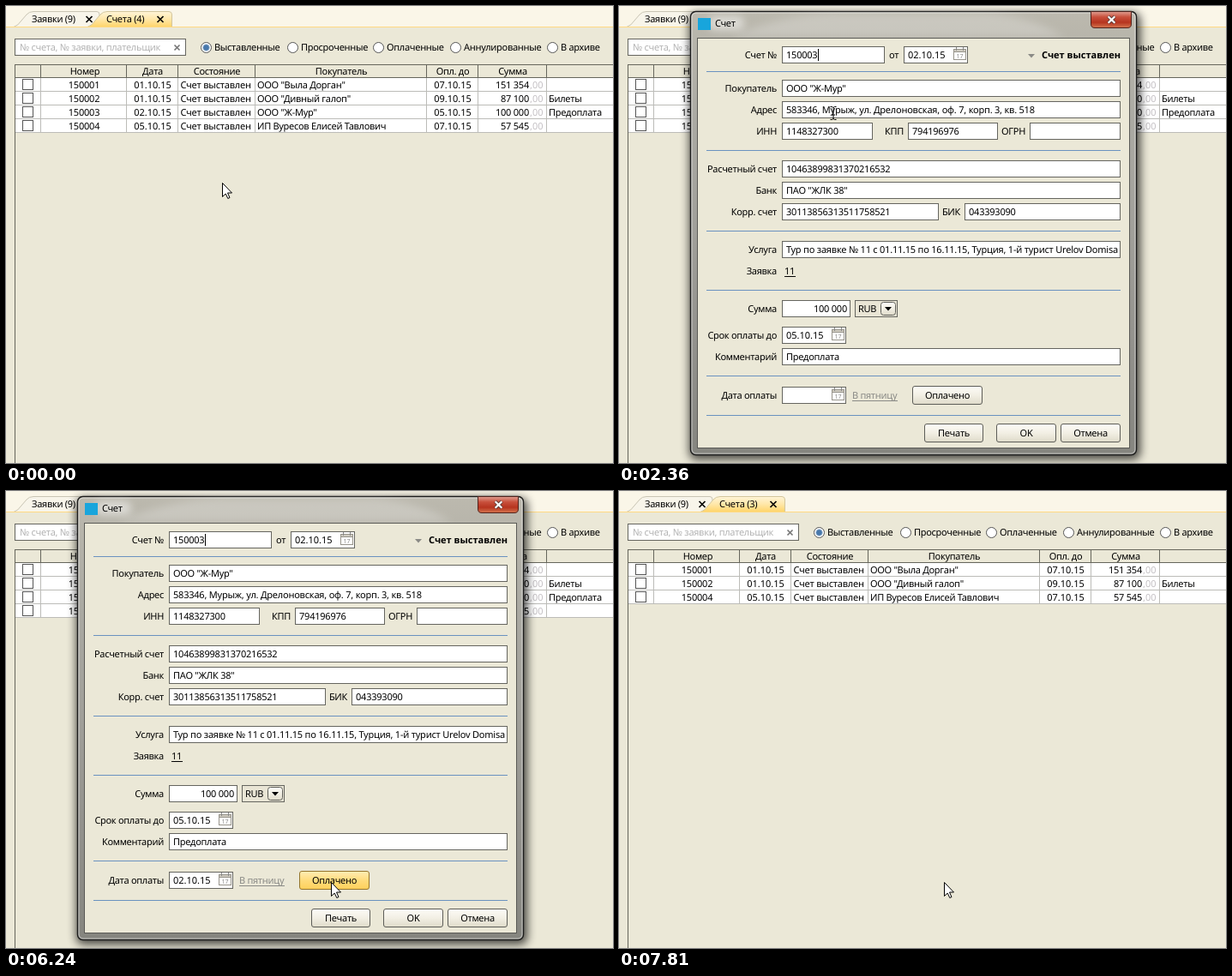
An HTML page that plays this animation: 708x533 px, repeating every 8 s.

```html
<!DOCTYPE html>
<html lang="ru">
<head>
<meta charset="utf-8">
<title>Счета</title>
<style>
html, body { margin: 0; width: 100%; height: 100%; overflow: hidden; background: #ebe8d7; }
svg { display: block; width: 708px; height: 533px; }
text { font: 11px "Noto Sans", "Open Sans", sans-serif; letter-spacing: -.3px; fill: #000; white-space: pre; text-rendering: geometricPrecision; }
.num { letter-spacing: -.22px; }
.date { letter-spacing: 0; }
.bold { font-weight: bold; letter-spacing: 0; }
.hint { fill: #b3b3b3; }
.dim { fill: #c4c0c4; }
.link { fill: #8b8b87; }
.tiny { font-size: 7px; fill: #888; letter-spacing: 0; }
.field { fill: #fff; stroke: #65655f; }
.rule { stroke: #6a92c0; }
.btn { fill: url(#btn); stroke: #5d5d58; }
.x { fill: none; stroke: #000; stroke-width: 1.7; }
</style>
</head>
<body>
<svg id="stage" viewBox="0 0 708 533" xmlns="http://www.w3.org/2000/svg"></svg>
<script>
const LOOP = 8000;
const stage = document.getElementById('stage');

const text = (x, y, s, cls = '', anchor = 'start', extra = '') =>
  `<text x="${x}" y="${y}" class="${cls}" text-anchor="${anchor}" ${extra}>${s}</text>`;
const rect = (x, y, w, h, attrs) => `<rect x="${x}" y="${y}" width="${w}" height="${h}" ${attrs}/>`;
const line = (x1, y1, x2, y2, attrs) => `<path d="M${x1} ${y1}L${x2} ${y2}" ${attrs}/>`;
const cross = (x, y, r, attrs = '') =>
  `<path class="x" d="M${x - r} ${y - r}l${2 * r} ${2 * r}m0 ${-2 * r}l${-2 * r} ${2 * r}" ${attrs}/>`;
const grad = (id, ...stops) => `<linearGradient id="${id}" x2="0" y2="1">` +
  stops.map((c, i) => `<stop offset="${i / (stops.length - 1)}" stop-color="${c}"/>`).join('') + '</linearGradient>';

// Main window
const COLS = [40, 140, 200, 290, 490, 550, 630];
const HEADS = [['Номер', 92], ['Дата', 171], ['Состояние', 246], ['Покупатель', 391], ['Опл. до', 521], ['Сумма', 591]];
const ROWS = [
  ['150001', '01.10.15', 'ООО "Выла Дорган"', '07.10.15', '151 354', ''],
  ['150002', '01.10.15', 'ООО "Дивный галоп"', '09.10.15', '87 100', 'Билеты'],
  ['150003', '02.10.15', 'ООО "Ж-Мур"', '05.10.15', '100 000', 'Предоплата'],
  ['150004', '05.10.15', 'ИП Вуресов Елисей Тавлович', '07.10.15', '57 545', '']
];
const RADIOS = [['Выставленные', 233], ['Просроченные', 334], ['Оплаченные', 434], ['Аннулированные', 524], ['В архиве', 637]];

function tableRow([no, date, buyer, due, sum, note], i) {
  const y = 84 + i * 16, base = y + 12;
  return `<g id="row${i}">` +
    rect(11, y, 697, 16, 'fill="#fff"') +
    line(11, y + 15.5, 708, y + 15.5, 'stroke="#bcbcb8"') +
    COLS.map(x => line(x + .5, y, x + .5, y + 16, 'stroke="#bcbcb8"')).join('') +
    rect(19.5, y + 1.5, 12, 12, 'fill="#fff" stroke="#555"') +
    text(91, base, no, 'num', 'middle') +
    text(171, base, date, 'date', 'middle') +
    text(203.5, base, 'Счет выставлен', 'num') +
    text(293, base, buyer) +
    text(521, base, due, 'date', 'middle') +
    text(610, base, sum, 'num', 'end') +
    text(611, base, ',00', 'dim date') +
    text(633, base, note) + '</g>';
}

function radio([label, x], i) {
  return `<circle cx="${x + .5}" cy="48.5" r="6" fill="#fff" stroke="#555"/>` +
    (i ? '' : `<circle cx="${x + .5}" cy="48.5" r="3.8" fill="#4878ab" stroke="#a9c1da" stroke-width=".8"/>`) +
    text(x + 10, 52, label);
}

function mainWindow() {
  return rect(0, 0, 708, 533, 'fill="#ebe8d7"') +
    rect(0, 0, 708, 24, 'fill="#faf6e8"') +
    '<path d="M9 24.500Q14 23 18 17L24 10Q27 6.500 32 6.500H106Q109 6.500 109 10V24.500" fill="#f8f5ea" stroke="#c9c5b4"/>' +
    '<path d="M95 24.500Q100 23 104 17L110 10Q113 6.500 118 6.500H190Q193.500 6.500 193.500 10V24.500" fill="url(#tab)" stroke="#d3c69c"/>' +
    line(0, 24.5, 708, 24.5, 'stroke="#ffd983"') +
    text(30, 19, 'Заявки (9)') + cross(97, 15.5, 3.5) +
    text(117, 19, '', '', 'start', 'id="count"') + cross(180, 15.5, 3.5) +
    rect(10.5, 38.5, 199, 19, 'class="field"') +
    text(16, 52, '№ счета, № заявки, плательщик', 'hint') +
    cross(199.5, 48.5, 3, 'style="stroke:#777"') +
    RADIOS.map(radio).join('') +
    rect(11, 69, 697, 14, 'fill="#ebe8d7"') +
    line(10, 68.5, 708, 68.5, 'stroke="#66665c"') +
    line(10, 83.5, 708, 83.5, 'stroke="#66665c"') +
    COLS.map(x => line(x + .5, 68, x + .5, 84, 'stroke="#66665c"')).join('') +
    HEADS.map(([s, x]) => text(x, 80, s, '', 'middle')).join('') +
    ROWS.map(tableRow).join('') +
    line(10.5, 68, 10.5, 533, 'stroke="#66665c"') +
    rect(200.7, 115.7, 89.6, 15.6, 'id="cell" fill="none" stroke="#efb93a" stroke-width="1.5"');
}

// Invoice dialog
const label = (y, s, x = 184) => text(x, y, s, '', 'end');
const field = (x, y, w, s = '', cls = '') =>
  rect(x + .5, y + .5, w - 1, 19, 'class="field"') + text(x + 5, y + 14, s, cls);
const button = (x, y, w, s, id = '') =>
  rect(x + .5, y + .5, w - 1, 21, `class="btn" rx="2.500" ${id}`) + text(x + w / 2, y + 15, s, '', 'middle');

function dateField(x, y, s, id = '') {
  const cx = x + 58.5;
  return rect(x + .5, y + .5, 74, 19, 'class="field"') + text(x + 5, y + 14, s, 'date', 'start', id) +
    rect(cx, y + 3.5, 14, 12, 'fill="#fff" stroke="#97948b"') +
    rect(cx, y + 3.5, 14, 3, 'fill="#cfcbc0" stroke="#97948b"') +
    line(cx + 3, y + 1, cx + 3, y + 5, 'stroke="#888"') + line(cx + 11, y + 1, cx + 11, y + 5, 'stroke="#888"') +
    text(cx + 7, y + 14, '17', 'tiny', 'middle');
}

function dialogBody() {
  return [76, 168, 262, 331, 431, 477].map(y => line(102, y + .5, 585, y + .5, 'class="rule"')).join('') +
    label(61, 'Счет №') + field(190, 47, 120, '150003', 'num') + text(315, 61, 'от') + dateField(332, 47, '02.10.15') +
    '<path d="M477 56h8l-4 4.500z" fill="#8a8a86"/>' + text(585, 61, 'Счет выставлен', 'bold', 'end') +
    label(100, 'Покупатель') + field(190, 86, 395, 'ООО "Ж-Мур"') +
    label(125, 'Адрес') + field(190, 111, 395, '583346, Мурыж, ул. Дрелоновская, оф. 7, корп. 3, кв. 518', 'num') +
    label(150, 'ИНН') + field(190, 136, 106, '1148327300', 'num') +
    label(150, 'КПП', 332) + field(337, 136, 105, '794196976', 'num') +
    label(150, 'ОГРН', 474) + field(479, 136, 106) +
    label(194, 'Расчетный счет') + field(190, 180, 395, '10463899831370216532', 'num') +
    label(219, 'Банк') + field(190, 205, 395, 'ПАО "ЖЛК 38"') +
    label(244, 'Корр. счет') + field(190, 230, 183, '30113856313511758521', 'num') +
    label(244, 'БИК', 398) + field(403, 230, 182, '043393090', 'num') +
    label(288, 'Услуга') + field(190, 274, 395) +
    '<g clip-path="url(#service)">' +
    text(195, 288, 'Тур по заявке № 11 с 01.11.15 по 16.11.15, Турция, 1-й турист Urelov Domisan', 'num') + '</g>' +
    label(313, 'Заявка') + text(193, 313, '11', 'num') + line(193, 315.5, 206, 315.5, 'stroke="#000"') +
    label(357, 'Сумма') + field(190, 343, 80) + text(266, 357, '100 000', 'num', 'end') +
    rect(275.5, 343.5, 49, 19, 'fill="#e9e5d5" stroke="#65655f"') + text(279, 357, 'RUB') +
    rect(305.5, 345.5, 17, 15, 'class="btn" rx="3"') + '<path d="M310 351h8l-4 4.500z"/>' +
    label(388, 'Срок оплаты до') + dateField(190, 374, '05.10.15') +
    label(413, 'Комментарий') + field(190, 399, 395, 'Предоплата') +
    label(458, 'Дата оплаты') + dateField(190, 444, '', 'id="paid"') +
    text(272, 458, 'В пятницу', 'link') + line(272, 460.5, 325, 460.5, 'stroke="#8b8b87"') +
    button(342, 443, 82, 'Оплачено', 'id="pay"') +
    button(356, 487, 69, 'Печать') + button(440, 487, 70, 'OK') + button(515, 487, 70, 'Отмена') +
    line(232.5, 50, 232.5, 64, 'id="caret" stroke="#000"');
}

function dialog() {
  return '<g id="dialog">' +
    rect(82, 8, 526, 521, 'rx="8" fill="#000" opacity=".7" filter="url(#blur)"') +
    rect(83.5, 6.5, 520, 517, 'rx="6" fill="url(#glass)" stroke="#1c1c1c" stroke-width="1.4"') +
    '<path d="M130 36Q190 10 250 9H430Q480 12 520 36Z" fill="#fff" opacity=".22" filter="url(#glow)"/>' +
    rect(85, 8, 517, 514, 'rx="5" fill="none" stroke="#fff" stroke-opacity=".55"') +
    rect(104, 12, 42, 16, 'rx="8" fill="#fff" opacity=".5" filter="url(#glow)"') +
    rect(92, 14, 15, 14, 'fill="#18a5dc"') + text(112, 24, 'Счет') +
    '<path d="M550.500 6.500H597.500V21Q597.500 25.500 593 25.500H555Q550.500 25.500 550.500 21Z" fill="url(#close)" stroke="#52231d"/>' +
    cross(574.5, 16, 3.8, 'style="stroke:#5b3b37;stroke-width:4"') + cross(574.5, 16, 3.8, 'style="stroke:#fff;stroke-width:2.2"') +
    rect(91.5, 37.5, 504, 478, 'fill="#ebe8d7" stroke="#5a5a56"') +
    `<g id="body">${dialogBody()}</g></g>`;
}

const cursors = `<g id="cursor" stroke="#000">
  <path id="arrow" fill="#fff" d="M.5 .5V16.500L4.200 13L6.800 18.500L9 17.500L6.500 12H11.500Z"/>
  <path id="beam" fill="none" d="M-3.500 -7.500H-1.500L0 -6.500L1.500 -7.500H3.500M0 -6.500V6.500M-3.500 7.500H-1.500L0 6.500L1.500 7.500H3.500M-2 2H2"/>
  <path id="hand" fill="#fff" d="M5.500 13V2Q7 -1 8.500 2V8Q10 6.500 11 8Q12.500 7 13.500 8.500Q15.500 8 16.500 10V14Q16.500 16.500 14.500 18.500V21.500H7V19.500Q4.500 17 2.500 13.500Q.2 10.500 2 9.800Q3.500 9.600 5.500 13ZM8.500 8V11.500M11 8V11.500M13.500 8.500V12"/>
</g>`;

stage.innerHTML = '<defs>' +
  grad('tab', '#fff5d8', '#ffe7a8', '#ffd468') +
  grad('btn', '#fdfcf7', '#f2efe4', '#dfdbca') +
  grad('hover', '#ffedb5', '#ffdc7c', '#ffd05a') +
  grad('press', '#ffd56a', '#ffcb43', '#ffd65c') +
  grad('glass', '#bcb9ae', '#aaa9a2', '#a09f99', '#92918c', '#85857f') +
  grad('close', '#e0a093', '#c8503c', '#b6341f', '#d5764f') +
  '<filter id="blur" x="-10%" y="-10%" width="120%" height="120%"><feGaussianBlur stdDeviation="5.5"/></filter>' +
  '<filter id="glow" x="-50%" y="-80%" width="200%" height="260%"><feGaussianBlur stdDeviation="5"/></filter>' +
  '<clipPath id="service"><rect x="191" y="275" width="392" height="18"/></clipPath></defs>' +
  mainWindow() + dialog() + '<circle id="ring" r="10" fill="none" stroke="#222"/>' + cursors;

const el = {};
stage.querySelectorAll('[id]').forEach(n => { el[n.id] = n; });
const show = (name, on) => { el[name].style.display = on ? '' : 'none'; };
const within = (t, a, b) => t >= a && t < b;

// Pointer stops: time, x, y and, when it changes, the shape
const PATH = [
  [0, 252, 206, 'arrow'], [620, 252, 197], [740, 252, 182], [890, 252, 161], [1030, 250, 146],
  [1150, 248, 133], [1280, 247, 124], [1420, 247, 123], [2360, 250, 125, 'beam'], [3330, 257, 153, 'arrow'],
  [3450, 288, 286, 'beam'], [3600, 291, 328, 'arrow'], [3720, 293, 370], [3840, 285, 395],
  [3980, 284, 409, 'beam'], [4110, 281, 432, 'arrow'], [4230, 278, 448, 'hand'], [4370, 282, 457],
  [4530, 283, 457], [4680, 285, 457], [5690, 287, 458], [5830, 326, 458, 'arrow'], [5950, 352, 456],
  [6100, 377, 456], [6240, 379, 456]
];
const BLINKS = [2760, 3330, 3840, 4230, 4680, 5110, 5690, 6240, 6650, 7210, 7510];
const RINGS = [[1820, 2220, 248.5, 124.5], [5110, 5230, 291.5, 455.5], [7510, 7670, 380.5, 457.5]];

function render(t) {
  let pos = PATH[0], shape;
  for (const stop of PATH) {
    if (stop[0] > t) break;
    pos = stop;
    shape = stop[3] || shape;
  }
  el.cursor.setAttribute('transform', `translate(${pos[1]} ${pos[2]})`);
  for (const name of ['arrow', 'beam', 'hand']) show(name, name === shape);

  const ring = RINGS.find(([a, b]) => within(t, a, b));
  show('ring', ring);
  if (ring) el.ring.setAttribute('transform', `translate(${ring[2]} ${ring[3]})`);

  show('dialog', within(t, 2220, 7670));
  show('body', t >= 2360);
  show('caret', BLINKS.filter(b => b <= t).length % 2 === 0);
  el.paid.textContent = t >= 5230 ? '02.10.15' : '';
  el.pay.style.fill = t >= 7510 ? 'url(#press)' : t >= 5950 ? 'url(#hover)' : '';
  el.pay.style.stroke = t >= 5950 ? '#94752c' : '';

  const done = t >= 7810;
  show('cell', t >= 1970 && !done);
  show('row2', !done);
  el.row3.setAttribute('transform', `translate(0 ${done ? -16 : 0})`);
  el.count.textContent = `Счета (${done ? 3 : 4})`;
}

const start = performance.now();
function tick() {
  render((performance.now() - start) % LOOP);
  requestAnimationFrame(tick);
}
tick();
</script>
</body>
</html>
```
